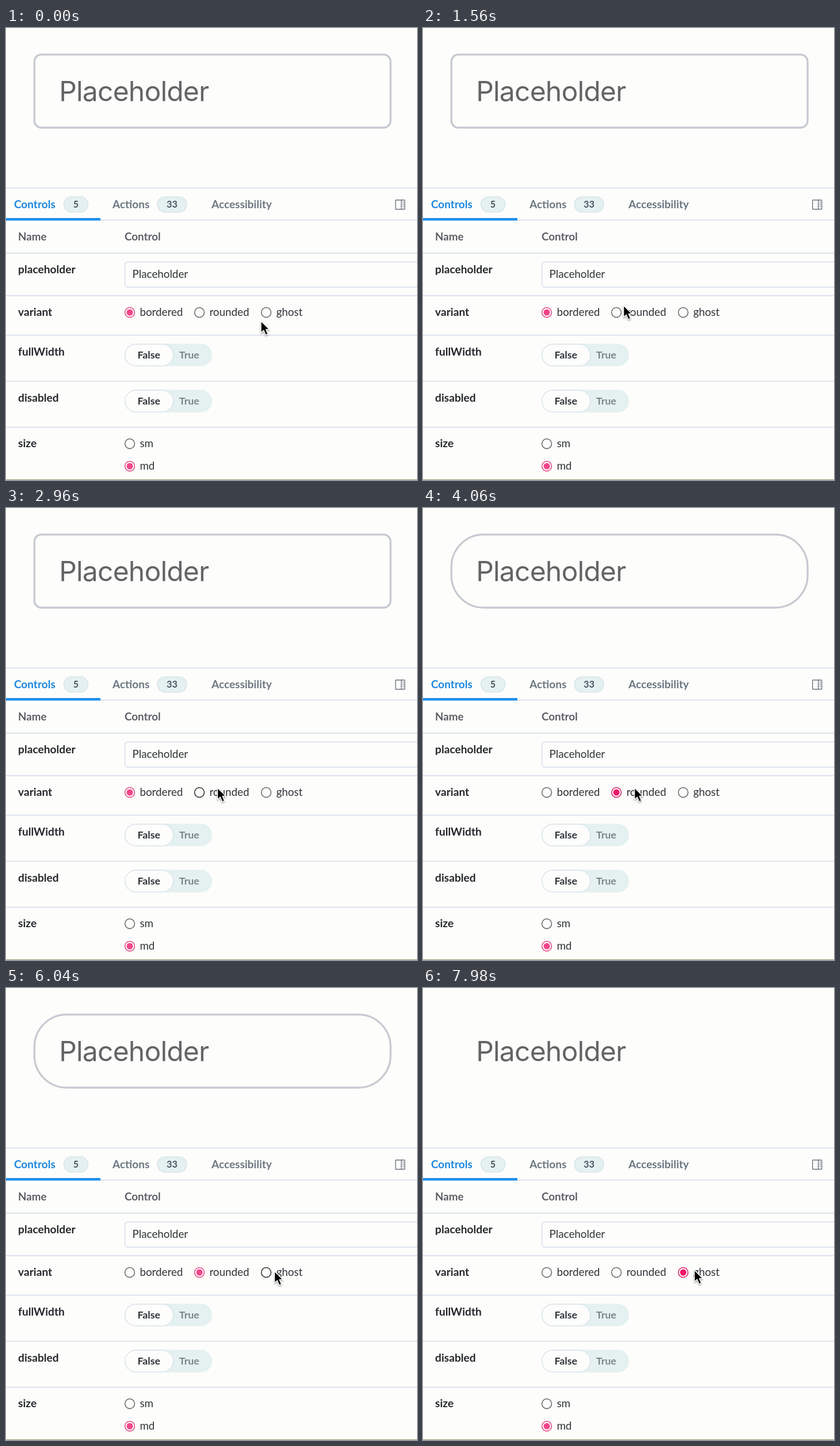
Recreate the animation shown at these times as an HTML page. Size 714x785 px, loop 8 s.

```html
<!DOCTYPE html>
<html lang="en">
<head>
<meta charset="utf-8">
<title>Input controls</title>
<style>
  html, body { margin: 0; width: 100%; height: 100%; overflow: hidden; background: #fdfdfb; }
  svg { display: block; width: 714px; height: 785px; }
  text { font: 18.8px Lato, "Open Sans", sans-serif; fill: #2e3438; white-space: pre; }
  .bold { font-size: 19.2px; font-weight: 700; fill: #24282c; }
  .head { font-weight: 700; fill: #5c5f65; }
  .tab { font-size: 19px; font-weight: 700; fill: #6b7680; }
  .active { fill: #1c87e0; }
  .count { font-size: 16.2px; font-weight: 700; fill: #4a5560; text-anchor: middle; }
  .option { font-size: 17.8px; font-weight: 700; text-anchor: middle; }
  .off { fill: #7b868c; }
  .big { font: 48px Inter, sans-serif; letter-spacing: -.8px; fill: #646464; }
  .line { stroke: #d3dcec; stroke-width: 1.4; fill: none; }
  .pill { fill: #e5f0f0; stroke: #d2e0e9; stroke-width: 1.2; }
  .ring { fill: #fdfdfb; stroke: #666; stroke-width: 1.5; }
  .dot { fill: none; }
  .hover .ring { stroke: #2c2c2c; }
  .checked .ring { stroke: #e4437f; }
  .checked .dot { fill: #f2468a; }
  .checked.hover .ring { stroke: #d81b60; }
  .checked.hover .dot { fill: #f01669; }
  #field { fill: none; stroke: #c6cad2; stroke-width: 3.3; }
  #pointer { filter: drop-shadow(0 2px 1.5px rgba(0, 0, 0, .35)); }
</style>
</head>
<body>
<svg viewBox="0 0 714 785" xmlns="http://www.w3.org/2000/svg">
  <rect width="714" height="785" fill="#fdfdfb"/>
  <rect id="field" x="49.3" y="46.2" width="618.8" height="126.8" rx="12"/>
  <text class="big" x="92.2" y="127">Placeholder</text>
  <g id="panel"></g>
  <g fill="none" stroke="#6b7680" stroke-width="1.4">
    <rect x="676.7" y="298.7" width="16" height="16" rx=".8"/>
    <path d="M686.7 299V315M689 302.5H691M689 306H691M689 309.5H691"/>
  </g>
  <rect y="330" width="164" height="4.4" fill="#1d8eee"/>
  <rect y="784" width="714" height="1" fill="#8f9869"/>
  <path id="pointer" d="M0 0V20.2L4.6 15.9L8.2 24L12 22.4L8.5 14.5H14.6Z"
        fill="#000" stroke="#fff" stroke-width="1.3" stroke-linejoin="round"/>
</svg>
<script>
const LOOP = 8000;
const ROUNDED_AT = 3700, GHOST_AT = 7000;
const panel = document.getElementById('panel');
const field = document.getElementById('field');
const pointer = document.getElementById('pointer');

function add(tag, attrs, parent = panel, content = '') {
  const node = document.createElementNS('http://www.w3.org/2000/svg', tag);
  for (const key in attrs) node.setAttribute(key, attrs[key]);
  node.textContent = content;
  return parent.appendChild(node);
}

const label = (content, x, y, cls = '') => add('text', { x, y, class: cls }, panel, content);

function badge(content, x, width) {
  add('rect', { x, y: 293, width, height: 27, rx: 13.5, class: 'pill' });
  label(content, x + width / 2, 312, 'count');
}

function toggle(y) {
  add('rect', { x: 206, y, width: 152, height: 39, rx: 19.5, fill: '#e5f0f0' });
  add('rect', { x: 206.6, y: y + .6, width: 84, height: 37.8, rx: 18.9,
    fill: '#fdfdfb', stroke: '#d3e0ea', 'stroke-width': 1.2 });
  label('False', 248.3, y + 25.5, 'option');
  label('True', 318.3, y + 25.5, 'option off');
}

function radio(content, x, y, checked = false) {
  const group = add('g', { class: checked ? 'checked' : '' });
  add('circle', { cx: x, cy: y, r: 8.4, class: 'ring' }, group);
  add('circle', { cx: x, cy: y, r: 5.5, class: 'dot' }, group);
  label(content, x + 17.4, y + 6);
  return group;
}

for (const y of [278, 333.5, 391, 465, 533.5, 613.5, 693.5])
  add('path', { d: `M0 ${y}H714`, class: 'line' });

label('Controls', 14, 313, 'tab active');
badge('5', 100.5, 42);
label('Actions', 185, 313, 'tab');
badge('33', 263, 51);
label('Accessibility', 357, 313, 'tab');
label('Name', 21, 368.5, 'head');
label('Control', 206, 368.5, 'head');

const rows = { placeholder: 425.5, variant: 500, fullWidth: 568.5, disabled: 648.5, size: 728 };
for (const name in rows) label(name, 21, rows[name], 'bold');

add('rect', { x: 206.5, y: 406.5, width: 530, height: 43.5, rx: 5, class: 'line' });
label('Placeholder', 219.6, 434);
toggle(548.5);
toggle(628.5);
radio('sm', 215, 722);
radio('md', 215, 761, true);

const variants = [
  { node: radio('bordered', 215, 494), left: 206, right: 310 },
  { node: radio('rounded', 336, 494), left: 327, right: 426 },
  { node: radio('ghost', 452, 494), left: 443, right: 520 }
];

// time, x, y
const path = [
  [0, 443, 509], [500, 348.5, 482], [2000, 348.5, 482], [2600, 367.5, 486], [4500, 367.5, 486],
  [5020, 400.5, 488], [5140, 400.5, 488], [5750, 466.5, 492], [6400, 466.5, 492],
  [6800, 471.5, 490], [LOOP, 471.5, 490]
];

function pointerAt(time) {
  const next = Math.max(1, path.findIndex(step => step[0] >= time));
  const [t0, x0, y0] = path[next - 1];
  const [t1, x1, y1] = path[next];
  const p = (time - t0) / (t1 - t0);
  const eased = p * p * (3 - 2 * p);
  return [x0 + (x1 - x0) * eased, y0 + (y1 - y0) * eased];
}

function draw(time) {
  const [x, y] = pointerAt(time);
  pointer.setAttribute('transform', `translate(${x} ${y})`);
  const selected = time < ROUNDED_AT ? 0 : time < GHOST_AT ? 1 : 2;
  variants.forEach(({ node, left, right }, i) => {
    node.classList.toggle('checked', i === selected);
    node.classList.toggle('hover', x >= left && x <= right && y > 483 && y < 505);
  });
  field.setAttribute('rx', selected === 1 ? 56 : 12);
  field.style.display = selected === 2 ? 'none' : '';
}

let start;
function tick(now) {
  start ??= now;
  draw((now - start) % LOOP);
  requestAnimationFrame(tick);
}
draw(0);
requestAnimationFrame(tick);
</script>
</body>
</html>
```
